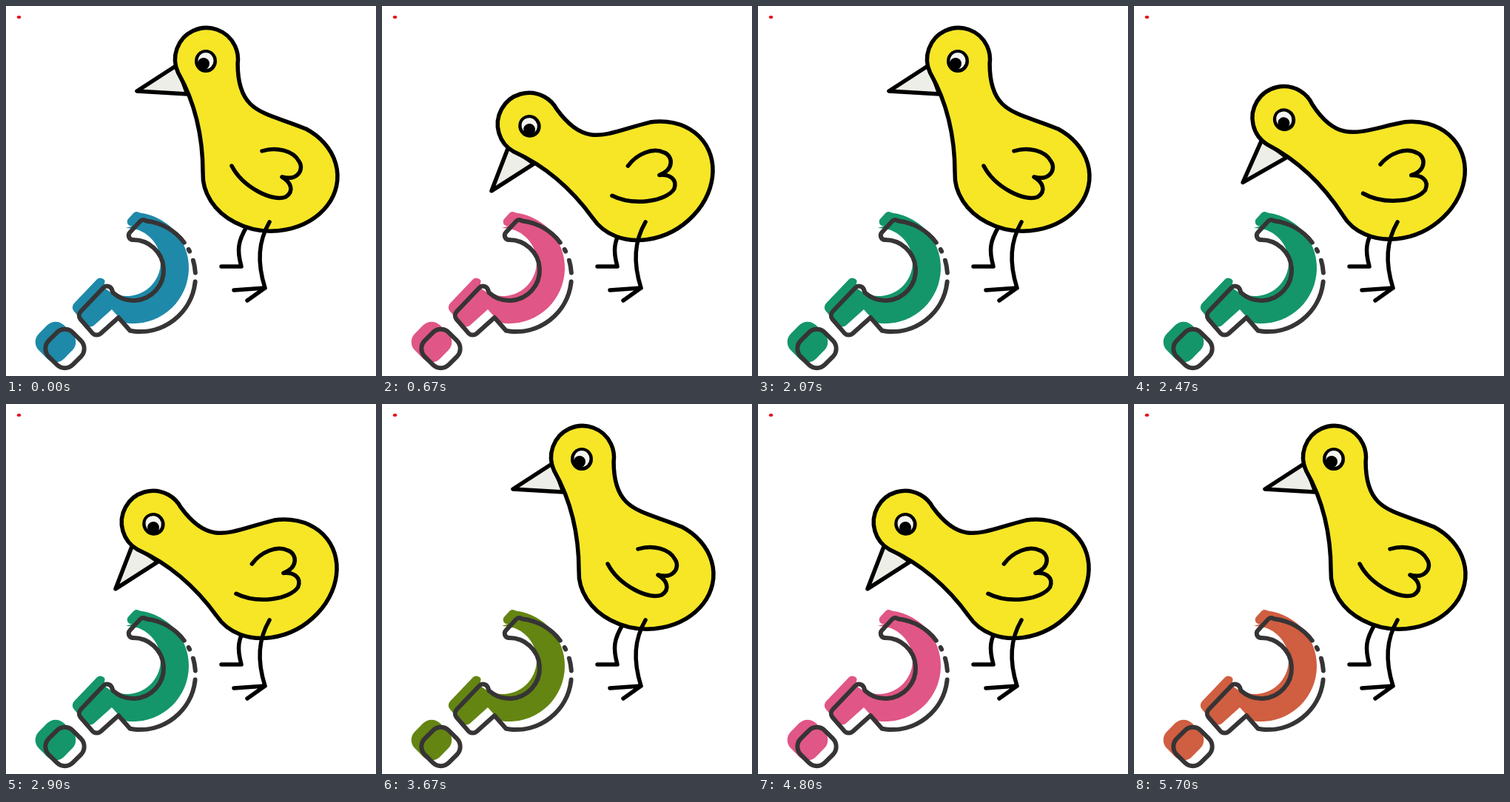
Recreate the animation shown at these times as an HTML page with a canvas. Size 500 by 500 pixels, loop 5.73 s.

```html
<!DOCTYPE html>
<html lang="en">
<head>
<meta charset="utf-8">
<title>Curious bird</title>
<style>
html, body { margin: 0; width: 100%; height: 100%; overflow: hidden; background: #fff; }
canvas { display: block; }
</style>
</head>
<body>
<canvas id="stage" width="500" height="500"></canvas>
<script>
const ctx = document.getElementById('stage').getContext('2d');
const LOOP = 5730, PECK = LOOP / 3, HUE_STEP = 52.08;
const BOW = -Math.PI / 5, PIVOT = [370, 227];
const COLORS = ['#1f89a9', '#4a7fc0', '#8a6dcc', '#c25bbd', '#e05686', '#d05e41', '#648512', '#14966a'];

const FAR_LEG = new Path2D('M326 297C313 318 312 330 318 352L291 352');
const NEAR_LEG = new Path2D('M356 292C341 318 339 346 350 381L308 384M350 381L326 398');
const BEAK = new Path2D('M231 80L177 115L245 119Z');
const WING = new Path2D('M305 216C320 245 360 265 378 258C390 250 385 238 373 231' +
  'C395 237 403 220 396 210C388 195 365 190 346 196');

// Round head and oval trunk joined by two neck curves.
const BODY = new Path2D();
BODY.arc(271, 72, 42.5, 2.7, 6.42);
BODY.bezierCurveTo(313, 146, 350, 143, 405, 166);
BODY.ellipse(357, 229, 91, 75, 0.04, -1.05, Math.PI);
BODY.bezierCurveTo(266, 180, 258, 135, 232.6, 90.2);
BODY.closePath();

function hook(innerRadius) {
  const p = new Path2D();
  p.arc(181, 365, 75, -1.45, 1.75);
  p.lineTo(152, 421);
  p.arcTo(122, 448, 96, 418, 8);
  p.arcTo(96, 418, 138, 374, 8);
  p.arcTo(138, 374, 146, 388, 7);
  p.arc(172, 357, innerRadius, 2.3, -1.6, true);
  p.arcTo(160, 314, 184, 288, 6);
  p.arcTo(184, 288, 190, 290.5, 6);
  p.closePath();
  return p;
}

function dot(x, y, size) {
  const p = new Path2D(), square = new Path2D();
  square.roundRect(-size / 2, -size / 2, size, size, size / 3);
  p.addPath(square, new DOMMatrix().translate(x, y).rotate(45));
  return p;
}

const HOOK_LINE = hook(41), DOT_LINE = dot(79.5, 463, 46);
const FILLS = new Path2D();
FILLS.addPath(hook(46), new DOMMatrix().translate(-9, -11));
FILLS.addPath(dot(67, 454, 48));

const smooth = (t, from, to) => {
  const x = Math.min(1, Math.max(0, (t - from) / (to - from)));
  return x * x * (3 - 2 * x);
};

function ink(path, fill, color = '#000', width = 5.5) {
  if (fill) { ctx.fillStyle = fill; ctx.fill(path); }
  ctx.strokeStyle = color;
  ctx.lineWidth = width;
  ctx.stroke(path);
}

function disc(x, y, rx, ry, color) {
  ctx.fillStyle = color;
  ctx.beginPath();
  ctx.ellipse(x, y, rx, ry, 0, 0, 7);
  ctx.fill();
}

function question(color) {
  ctx.fillStyle = color;
  ctx.fill(FILLS);
  ctx.setLineDash([60, 11, 3, 13, 17, 12, 2000, 0]);
  ink(HOOK_LINE, null, '#363435', 6);
  ctx.setLineDash([]);
  ink(DOT_LINE, null, '#363435', 6);
}

function bird(bow) {
  ink(FAR_LEG);
  ctx.save();
  ctx.translate(...PIVOT);
  ctx.rotate(bow * BOW);
  ctx.translate(-PIVOT[0], -PIVOT[1]);
  ink(BEAK, '#eeeee8');
  ink(BODY, '#f6e626');
  ink(WING);
  disc(270, 74.5, 15, 15.5, '#000');
  disc(270, 74, 10.5, 11, '#f4f4f0');
  disc(267, 78, 8, 8, '#000');
  ctx.restore();
  ink(NEAR_LEG);
}

function draw() {
  const t = (performance.now() - start) % LOOP, p = t % PECK;
  ctx.clearRect(0, 0, 500, 500);
  ctx.lineCap = ctx.lineJoin = 'round';
  disc(17.5, 15, 2.8, 2, '#e5141c');
  question(COLORS[Math.floor(t / HUE_STEP) % COLORS.length]);
  bird(smooth(p, 190, 640) - smooth(p, 1010, 1160));
  requestAnimationFrame(draw);
}
const start = performance.now();
draw();
</script>
</body>
</html>
```
